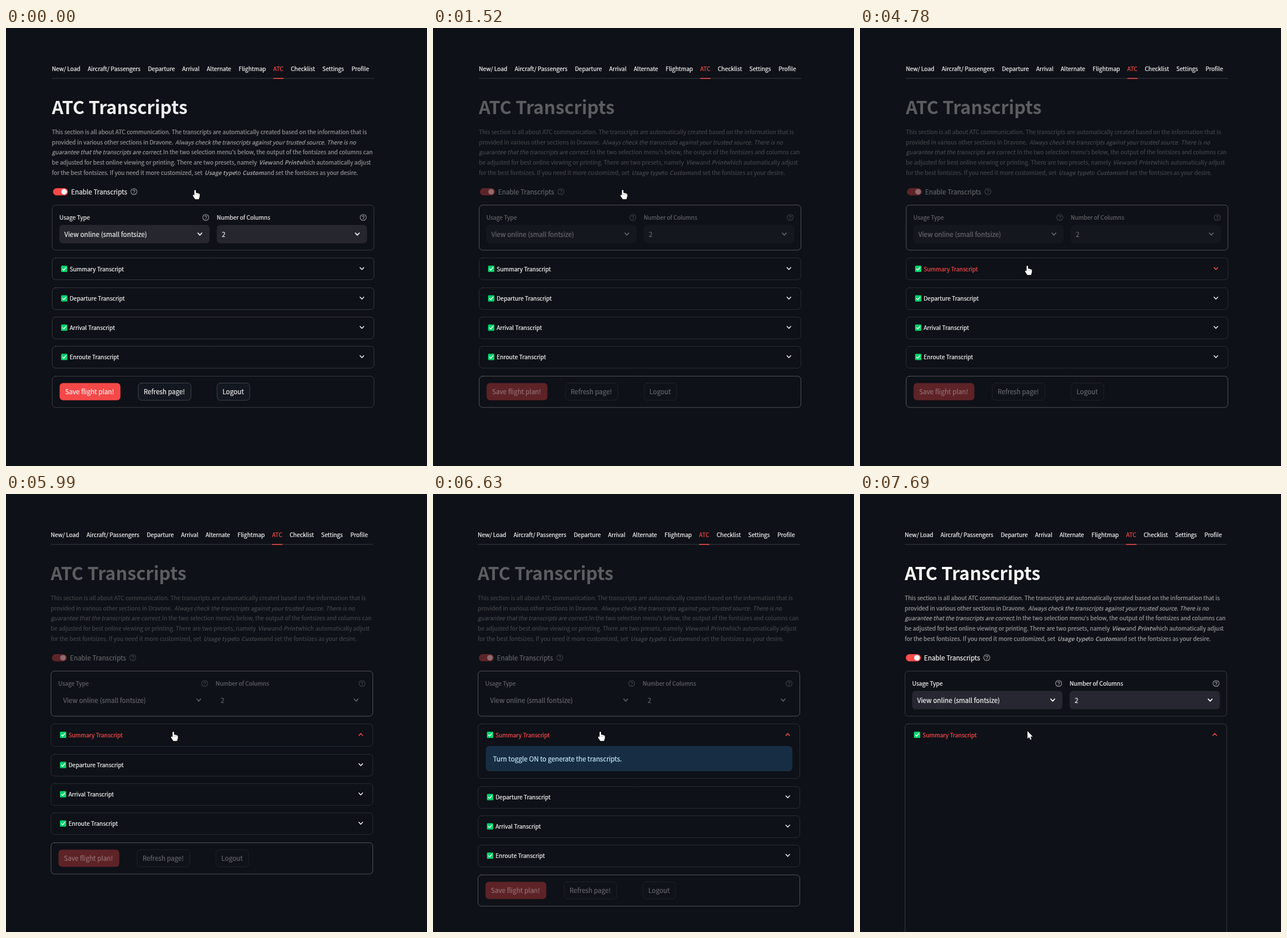
An HTML page with a canvas for the animation above (8000 ms loop, 734x763 px).

```html
<!DOCTYPE html>
<html lang="en">
<head>
<meta charset="utf-8">
<title>ATC Transcripts</title>
<style>
html, body { margin: 0; width: 100%; height: 100%; overflow: hidden; background: #0e1117; }
canvas { display: block; }
</style>
</head>
<body>
<canvas id="stage" width="734" height="763"></canvas>
<script>
const ctx = document.getElementById('stage').getContext('2d');
const LOOP = 8000;
const FAMILY = '"Source Sans 3", "Noto Sans CJK JP", "Noto Sans CJK SC", "Noto Sans CJK", "Open Sans", sans-serif';
const SMALL = 9.97, BODY = 11.38, TITLE = 31.4;
const BG = '#0e1117', WHITE = '#fafafa', RED = '#ff4b4b', GREY = 'rgb(156,157,159)';

const clamp = v => Math.max(0, Math.min(1, v));
const mix = (a, b, p) => a + (b - a) * p;
// last entry of [time, ...values] already reached
const stepAt = (list, t) => list.reduce((cur, row) => t >= row[0] ? row : cur);

// cubic-bezier(.42, 0, 1, 1)
function easeIn(x) {
  x = clamp(x);
  let lo = 0, hi = 1;
  for (let i = 0; i < 20; i++) {
    const m = (lo + hi) / 2, n = 1 - m;
    if (3 * n * n * m * .42 + 3 * n * m * m + m * m * m < x) lo = m; else hi = m;
  }
  return 3 * (1 - lo) * lo * lo + lo ** 3;
}

function text(str, x, y, size = SMALL, color = WHITE, style = '') {
  ctx.font = `${style} ${size}px ${FAMILY}`;
  ctx.fillStyle = ctx.strokeStyle = color;
  ctx.fillText(str, x, y);
  if (style.includes('bold')) return;
  // a hairline outline gives the slightly heavier screen weight
  ctx.lineWidth = .2;
  ctx.strokeText(str, x, y);
}

function box(x, y, w, h, r, fill, stroke) {
  ctx.beginPath();
  ctx.roundRect(x, y, w, h, r);
  if (fill) { ctx.fillStyle = fill; ctx.fill(); }
  if (stroke) { ctx.strokeStyle = stroke; ctx.lineWidth = 1; ctx.stroke(); }
}

function line(points, color, width) {
  ctx.beginPath();
  points.forEach(([x, y]) => ctx.lineTo(x, y));
  ctx.strokeStyle = color;
  ctx.lineWidth = width;
  ctx.lineCap = ctx.lineJoin = 'round';
  ctx.stroke();
}

function chevron(x, y, color, up, w = 3.3, width = 1.4) {
  const d = up ? -1.8 : 1.8;
  line([[x - w, y - d], [x, y + d], [x + w, y - d]], color, width);
}

function help(x, y) {
  ctx.beginPath();
  ctx.arc(x, y, 5.3, 0, 7);
  ctx.strokeStyle = GREY;
  ctx.lineWidth = 1.1;
  ctx.stroke();
  ctx.beginPath();
  ctx.arc(x, y - 1.2, 1.7, Math.PI, Math.PI * 2.3);
  ctx.lineTo(x, y + 1.3);
  ctx.stroke();
  ctx.fillStyle = GREY;
  ctx.fillRect(x - .6, y + 2.2, 1.2, 1.2);
}

const TABS = [['New/ Load', 80], ['Aircraft/ Passengers', 142.5], ['Departure', 247.5], ['Arrival', 307.3],
  ['Alternate', 350], ['Flightmap', 405.7], ['ATC', 466], ['Checklist', 496.5], ['Settings', 551.5], ['Profile', 602.5]];

function tabs() {
  ctx.fillStyle = '#2b2d34';
  ctx.fillRect(80, 87, 562, 1.5);
  ctx.fillStyle = RED;
  ctx.fillRect(466, 87, 18, 1.5);
  TABS.forEach(([s, x]) => text(s, x, 75, SMALL, s === 'ATC' ? RED : WHITE));
}

const IT = 'italic', BI = 'italic bold';
const INTRO = [
  ['This section is all about ATC communication. The transcripts are automatically created based on the information that is', 80, 0],
  ['provided in various other sections in Dravone.', 80, 1],
  ['Always check the transcripts against your trusted source. There is no', 295, 1, IT],
  ['guarantee that the transcripts are correct.', 80, 2, IT],
  ["In the two selection menu's below, the output of the fontsizes and columns can", 274, 2],
  ['be adjusted for best online viewing or printing. There are two presets, namely', 80, 3],
  ['View', 441, 3, BI], ['and', 465.5, 3], ['Print', 485.5, 3, BI], ['which automatically adjust', 511, 3],
  ['for the best fontsizes. If you need it more customized, set', 80, 4],
  ['Usage type', 346, 4, BI], ['to', 400, 4], ['Custom', 412, 4, BI],
  ['and set the fontsizes as your desire.', 449.7, 4]
];

function intro() {
  text('ATC Transcripts', 80, 150, TITLE, WHITE, 'bold');
  INTRO.forEach(([s, x, row, style]) => text(s, x, Math.round(185 + row * 17.7), SMALL, GREY, style));
  box(82, 279, 26, 12.6, 6.3, RED);
  ctx.beginPath();
  ctx.arc(101.3, 285.3, 4.9, 0, 7);
  ctx.fillStyle = WHITE;
  ctx.fill();
  text('Enable Transcripts', 113.5, 289.5, BODY);
  help(223, 285);
}

function select(x, label, value, filled) {
  text(label, x, 334);
  help(x + 255.3, 330);
  if (filled) box(x, 343, 262, 32, 6, '#262730');
  text(value, x + 8.7, 363.5, BODY);
  chevron(x + 245, 359, WHITE, false, 3.4, 1.7);
}

function button(x, w, label, red) {
  box(x + .5, 618.5, w, 30, 6, red ? RED : '#131720', red ? null : 'rgba(250,250,250,.2)');
  text(label, x + 10, 638, BODY);
}

function header(label, y, color, open) {
  box(96, y - 5.5, 11, 11, 1.5, '#00d26a');
  line([[98.6, y + .2], [100.7, y + 2.3], [104.6, y - 2.2]], '#fff', 1.4);
  text(label, 111, y + 4, SMALL, color);
  chevron(620.5, y - .5, color, open);
}

function hand(x, y) {
  ctx.save();
  ctx.translate(x, y);
  ctx.beginPath();
  ctx.moveTo(3.4, 11);
  ctx.lineTo(3.4, 2.2);
  ctx.quadraticCurveTo(4.7, -.2, 6, 2.2);
  ctx.lineTo(6, 6.4);
  ctx.quadraticCurveTo(7.5, 5.2, 8.5, 6.9);
  ctx.quadraticCurveTo(10, 6, 10.8, 7.7);
  ctx.quadraticCurveTo(12.6, 7.2, 12.8, 9);
  ctx.lineTo(12.6, 12.8);
  ctx.lineTo(11.2, 17.2);
  ctx.lineTo(4.7, 17.2);
  ctx.lineTo(.8, 11.2);
  ctx.quadraticCurveTo(.6, 9, 2.2, 9.6);
  ctx.closePath();
  ctx.lineJoin = 'round';
  ctx.strokeStyle = '#000';
  ctx.lineWidth = 1.4;
  ctx.stroke();
  ctx.fillStyle = '#fff';
  ctx.fill();
  [6, 8.5, 10.7].forEach(fx => line([[fx, 8], [fx, 9.8]], '#777', .5));
  ctx.restore();
}

function arrow(x, y) {
  ctx.save();
  ctx.translate(x, y);
  ctx.beginPath();
  [[0, 0], [0, 13.2], [2.9, 10.5], [4.9, 15], [7, 14], [5.1, 9.8], [9.2, 9.6]].forEach(([a, b]) => ctx.lineTo(a, b));
  ctx.closePath();
  ctx.lineJoin = 'round';
  ctx.strokeStyle = '#000';
  ctx.lineWidth = 1.2;
  ctx.stroke();
  ctx.fillStyle = '#fff';
  ctx.fill();
  ctx.restore();
}

const POINTER = [[0, hand, 325, 281], [1520, hand, 326, 281], [1800, hand, 327, 281], [2070, hand, 328, 281],
  [2630, hand, 329, 281], [3170, hand, 329, 282], [3320, hand, 328, 282], [3600, arrow, 333, 282.5],
  [3870, arrow, 325, 289], [4000, arrow, 286, 314], [4130, arrow, 238, 343], [4260, arrow, 203, 364],
  [4390, arrow, 192, 375], [4540, arrow, 222, 396], [4660, hand, 268, 409], [4780, hand, 287, 413],
  [7690, arrow, 292, 413]];

// extra height of the first panel
const GROWTH = [[0, 0], [5990, 1], [6110, 13], [6240, 27], [6370, 42], [6500, 52], [6630, 57],
  [7450, 57], [7570, 190], [7690, 420]];

const FADE_STEP = 125;

function draw(t) {
  const fresh = t >= 7450, open = t >= 5990;
  const fade = fresh ? 0 : easeIn(.2 + .8 * clamp(Math.floor((t + 5) / FADE_STEP) / 7));
  const alpha = mix(1, .33, fade);
  const grow = stepAt(GROWTH, t)[1];
  const formEdge = `rgba(250,250,250,${mix(.17, .27, fade)})`;
  const panelEdge = `rgba(250,250,250,${mix(.17, .11, fade)})`;
  const accent = t >= 4660 ? RED : WHITE;

  ctx.globalAlpha = 1;
  ctx.fillStyle = BG;
  ctx.fillRect(0, 0, 734, 763);
  ctx.save();
  if (open) ctx.translate(-2, 0);

  tabs();
  box(80.5, 308.5, 561, 78.5, 6, null, formEdge);
  ctx.globalAlpha = alpha;
  intro();
  select(93, 'Usage Type', 'View online (small fontsize)', !open || fresh);
  select(367.5, 'Number of Columns', '2', !open || fresh);
  ctx.globalAlpha = 1;

  box(80.5, 400.5, 561, 38 + grow, 6, null, panelEdge);
  header('Summary Transcript', 419.5, accent, open);
  if (open && !fresh) {
    ctx.save();
    ctx.beginPath();
    ctx.rect(81, 401, 560, 37.5 + grow);
    ctx.clip();
    const tick = Math.floor((t - 6500) / 135) * 135;
    ctx.globalAlpha = 1 - .67 * easeIn(tick / 1000);
    box(94, 439, 534.5, 44, 6, '#172d43');
    text('Turn toggle ON to generate the transcripts.', 106.5, 466, BODY, '#c7ebff');
    ctx.restore();
  }

  ctx.translate(0, grow);
  ['Departure', 'Arrival', 'Enroute'].forEach((name, i) => {
    const y = Math.round(452 + i * 51.2) + .5;
    box(80.5, y, 561, 38, 6, null, panelEdge);
    header(name + ' Transcript', y + 18.5, WHITE, false);
  });
  box(80.5, 606.5, 561, 54.5, 6, null, formEdge);
  ctx.globalAlpha = alpha;
  button(93, 106, 'Save flight plan!', true);
  button(230, 92, 'Refresh page!');
  button(367.5, 57, 'Logout');
  ctx.restore();

  ctx.globalAlpha = 1;
  const [, cursor, x, y] = stepAt(POINTER, t);
  cursor(x, y);
}

const begin = performance.now();
function frame() {
  draw((performance.now() - begin) % LOOP);
  requestAnimationFrame(frame);
}
frame();
</script>
</body>
</html>
```
